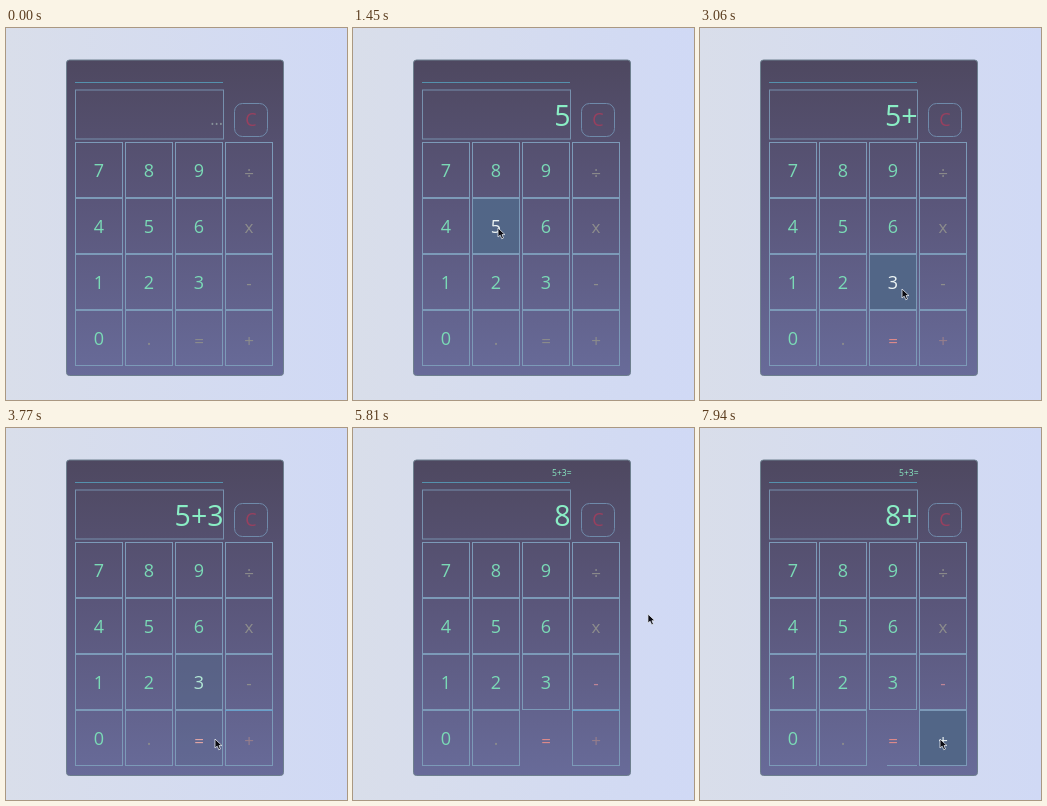
An HTML page with a canvas that plays this animation: 341x372 px, repeating every 8 s.

```html
<!DOCTYPE html>
<html lang="en">
<head>
<meta charset="utf-8">
<title>Calculator</title>
<style>
  html, body { margin: 0; width: 100%; height: 100%; overflow: hidden; background: #d6dcec; }
  canvas { display: block; width: 100%; height: 100%; }
</style>
</head>
<body>
<canvas id="stage" width="341" height="372"></canvas>
<script>
const ctx = document.getElementById('stage').getContext('2d');
const LOOP = 8000, TICK = 78.3, START = 550;
const FONT = '"Open Sans", "Noto Sans", sans-serif';
const MINT = '#8aeec5', LINE = '#7c9ab8';
const LABELS = '789÷456x123-0.=+';

// key, pointer enters, pointer leaves
const hovers = [
  ['x', 590, 800], ['6', 800, 950], ['5', 1340, 1680],
  ['3', 1800, 1880], ['=', 1880, 1960], ['+', 1960, 2400],
  ['3', 2480, 3530], ['=', 3765, 4680], ['+', 4680, 4840],
  ['-', 4840, 5020], ['-', 6640, 7300], ['+', 7500, 9000]
];

// Operators keep a warmer tint once the pointer has passed over them
const tints = {
  '=': [1880, [226, 140, 138]],
  '+': [2400, [151, 126, 140]],
  '-': [4840, [190, 132, 150]]
};

// time, x, y
const path = [
  [580, 267, 200], [1370, 145, 200], [1500, 145, 200],
  [2070, 240, 308], [2220, 240, 308], [2370, 218.5, 283],
  [2800, 202, 261], [3240, 202, 261], [3770, 209, 311],
  [4250, 208, 314], [4560, 208, 314], [5320, 295, 186],
  [5810, 295, 186], [6590, 254, 254], [7000, 255, 255],
  [7460, 240, 311], [8000, 240, 311]
];

// time, display
const entries = [
  [0, '...'], [1430, '5'], [2200, '5+'], [3200, '5+3'],
  [4540, '8'], [6740, '8-'], [7520, '8+']
];

const clamp = v => Math.max(0, Math.min(1, v));
const mix = (a, b, k) => a.map((v, i) => v + (b[i] - v) * k);
const rgb = c => `rgb(${c.map(Math.round)})`;

function gradient(x, y, ...stops) {
  const g = ctx.createLinearGradient(0, 0, x, y);
  stops.forEach(([at, color]) => g.addColorStop(at, color));
  return g;
}

function roundBox(x, y, w, h, r) {
  ctx.beginPath();
  ctx.roundRect(x, y, w, h, r);
}

function outline(x, y, w, h, color = LINE) {
  ctx.strokeStyle = color;
  ctx.lineWidth = 1;
  ctx.strokeRect(x + .5, y + .5, w - 1, h - 1);
}

function text(str, x, y, size, color, align = 'center') {
  ctx.font = `${size}px ${FONT}`;
  ctx.textAlign = align;
  ctx.fillStyle = color;
  ctx.fillText(str, x, y);
}

function glow(key, t) {
  return Math.max(0, ...hovers.filter(h => h[0] === key && t >= h[1]).map(([, enter, leave]) =>
    t < leave ? clamp((t - enter) / 100) : clamp(1 - (t - leave) / 500)));
}

function drawKey(label, i, t) {
  const x = 69 + i % 4 * 50, y = 114 + (i >> 2) * 56;
  const k = glow(label, t);
  if (k) {
    ctx.fillStyle = `rgba(82, 102, 135, ${k})`;
    ctx.fillRect(x, y, 48, 56);
  }
  if (label === '=' && t > 5000) {
    if (t > 7540) {
      ctx.fillStyle = LINE;
      ctx.fillRect(187, 337, 30, 1);
    }
  } else {
    outline(x, y, 48, 56);
  }
  if (label === '+' && t > 3500 && t < 7500) {
    ctx.fillStyle = '#699fca';
    ctx.fillRect(x, y, 48, 1);
  }
  const digit = /\d/.test(label);
  let color = digit ? [122, 218, 182] : [141, 141, 140];
  const tint = tints[label];
  if (tint && t >= tint[0]) color = tint[1];
  const drop = '÷=+'.includes(label) ? 36.5 : 34.5;
  text(label, x + 24, y + drop, digit ? 18 : 17, rgb(mix(color, [236, 244, 244], k)));
}

function drawCursor(t) {
  if (t < path[0][0]) return;
  const i = path.findIndex(p => p[0] > t);
  const [t0, x0, y0] = path[i - 1], [t1, x1, y1] = path[i];
  const u = (t - t0) / (t1 - t0), k = u * u * (3 - 2 * u);
  ctx.save();
  ctx.translate(x0 + (x1 - x0) * k, y0 + (y1 - y0) * k);
  ctx.fillStyle = '#0b0b12';
  ctx.strokeStyle = '#e8ecf4';
  ctx.lineWidth = .8;
  const arrow = new Path2D('M0 0V9L2.2 7.2 3.8 10.8 5.5 10 4 6.6H7Z');
  ctx.fill(arrow);
  ctx.stroke(arrow);
  ctx.restore();
}

function draw(t) {
  ctx.fillStyle = gradient(341, 0, [0, '#d9deea'], [1, '#d0d9f5']);
  ctx.fillRect(0, 0, 341, 372);

  roundBox(60.5, 32, 217, 315.5, 3);
  ctx.fillStyle = gradient(0, 348, [.09, '#4e4860'], [.5, '#5a567a'], [1, '#686b99']);
  ctx.fill();
  ctx.strokeStyle = '#6d7f8e';
  ctx.lineWidth = 1;
  ctx.stroke();

  ctx.fillStyle = '#5591ad';
  ctx.fillRect(69, 54, 148, 1);
  outline(69, 61.5, 149, 50, '#7790ad');
  roundBox(228.5, 75.5, 33, 33, 8);
  ctx.strokeStyle = '#6f8aaa';
  ctx.stroke();
  text('C', 245, 98, 18, '#98405f');

  const value = entries.filter(e => e[0] <= t).pop()[1];
  if (value === '...') text(value, 217, 97, 16, '#87929a', 'right');
  else text(value, 217.5, 98, 28.5, MINT, 'right');
  if (t > 4540) text('5+3=', 218.5, 48, 8.5, MINT, 'right');

  [...LABELS].forEach((label, i) => drawKey(label, i, t));
  drawCursor(t);
}

// The pointer and keys advance in even ticks
function frame(now) {
  const t = now % LOOP;
  const n = Math.floor((t - START) / TICK);
  draw(Math.max(0, Math.min(LOOP - 1, START + (n + .4) * TICK)));
  requestAnimationFrame(frame);
}
requestAnimationFrame(frame);
</script>
</body>
</html>
```
